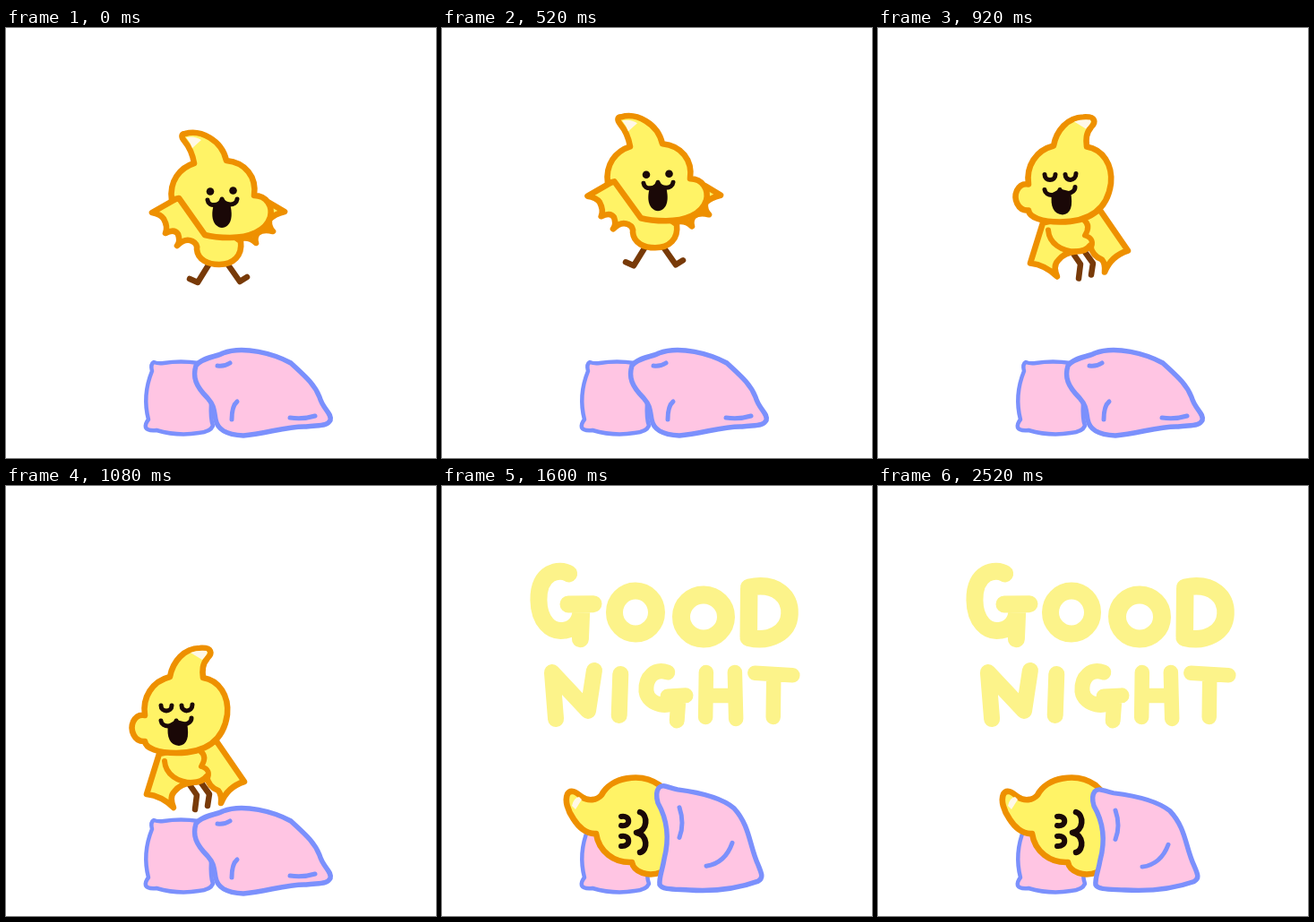
Write an HTML page with a canvas that moves like this. It is 480x480 px and loops after 2.56 s.

```html
<!DOCTYPE html>
<html lang="en">
<head>
<meta charset="utf-8">
<title>Good night</title>
<style>
html, body { margin: 0; width: 100%; height: 100%; overflow: hidden; background: #fff; }
canvas { display: block; width: 100vw; height: 100vh; object-fit: contain; }
</style>
</head>
<body>
<canvas width="480" height="480"></canvas>
<script>
const ctx = document.querySelector('canvas').getContext('2d');
const LOOP = 2560, STEP = 40, BEDTIME = 1200;
const YELLOW = '#fff366', ORANGE = '#ee9000', BROWN = '#783a08', INK = '#1a0807';
const PINK = '#ffc5e3', BLUE = '#7b90fc', LETTER = '#fcf38a';
ctx.lineCap = ctx.lineJoin = 'round';

function shape(d, fill, line, width = 6) {
  const path = new Path2D(d);
  if (fill) { ctx.fillStyle = fill; ctx.fill(path); }
  if (line) { ctx.strokeStyle = line; ctx.lineWidth = width; ctx.stroke(path); }
}
const skin = d => shape(d, YELLOW, ORANGE, 6.6);
const ink = (d, width = 5) => shape(d, null, INK, width);

function oval(x, y, rx, ry, fill, line, width, turn = 0) {
  ctx.beginPath();
  ctx.ellipse(x, y, rx, ry, turn, 0, 7);
  if (fill) { ctx.fillStyle = fill; ctx.fill(); }
  if (line) { ctx.strokeStyle = line; ctx.lineWidth = width; ctx.stroke(); }
}

function group(transform, draw) {
  ctx.save();
  transform();
  draw();
  ctx.restore();
}

// keys: [time, value] pairs, eased between neighbours
function tween(t, keys) {
  const i = keys.findIndex(k => k[0] > t);
  if (i < 0) return keys[keys.length - 1][1];
  if (i === 0) return keys[0][1];
  const [[t0, a], [t1, b]] = [keys[i - 1], keys[i]];
  const u = (t - t0) / (t1 - t0);
  return a + (b - a) * u * u * (3 - 2 * u);
}

function hoverBird(flap, yawning) {
  const w = flap;
  shape('M227 263L214 284L205 280M247 263L261 283L269 278', null, BROWN, 6.5);
  if (!yawning) {
    skin(`M294 195L311 ${205 + 5 * w}Q299 ${208 + 3 * w} 294 214Q293 222 298 227
      Q287 224 281 229Q277 234 279 240Q272 233 262 235Z`);
  }
  skin(`M${193 - 8 * w} ${189 + 2 * w}L${163 - 7 * w} ${206 + 5 * w}
    Q${173 - 4 * w} 208 ${176 - 2 * w} 213Q${181 - 4 * w} 222 ${178 - 4 * w} 229
    Q188 224 192 230Q195 238 191 243Q200 234 208 238Q214 241 213 247
    C214 259 226 264 238 264C254 264 264 254 262 238L240 222Z`);
  group(() => {
    if (!yawning) return;
    ctx.translate(222, 230);
    ctx.rotate(.07);
    ctx.translate(-222, -230);
  }, () => {
    skin(`M200 118C217 113 241 125 246 148C267 150 280 166 277 187
      C291 187 298 199 295 211C290 227 271 234 250 234C239 234 229 233 222 231
      L${193 - 8 * w} ${190 + w}L185 192C182 171 194 156 210 151
      C208 139 204 132 199 126C195 121 196 118 200 118Z`);
    shape('M201 122Q211 120 218 125L208 134Q206 128 201 122Z', '#fff8e8');
  });
  if (yawning) {
    ink('M225 181L235 182M252 184L262 185');
    oval(244, 204, 11.5, 16, '#000');
    oval(262, 226, 19, 14.5, YELLOW, ORANGE, 6.6, .55);
  } else {
    oval(228, 182.5, 4.3, 4.3, INK);
    oval(253.5, 181.5, 4.3, 4.3, INK);
    ink('M225 192C226 200 239 199 241 191C244 199 257 199 258 191');
    shape('M232 197L241 192L250 196C254 211 251 222 241 223C231 222 228 210 232 197Z', INK);
  }
}

function divingBird() {
  shape('M204 332L213 345L211 361M217 330L227 344L225 357', null, BROWN, 6.5);
  skin(`M171 299L157 344Q174 346 187 359Q182 347 188 341Q195 332 208 331
    Q219 331 224 324Q226 336 237 340Q241 345 240 354Q247 336 266 330L235 285Z`);
  shape('M177 307C178 322 192 331 208 331M217 296Q225 302 218 313Q230 317 224 328', null, ORANGE);
  skin(`M183 213C186 196 199 181 216 181C231 180 230 187 225 192
    C219 199 219 206 220 214C238 217 249 234 247 255C243 285 222 298 190 298
    C170 298 156 293 155 285C143 286 138 272 142 263C145 257 150 255 155 256
    C152 236 163 218 183 213Z`);
  shape('M206 186Q214 183 224 184Q226 187 219 194Z', '#fff8e8');
  ink('M173 245C173 253 185 253 185 245M196 245C196 253 208 253 208 244');
  ink('M173 262C174 270 188 270 190 262C192 269 207 267 207 259');
  shape('M181 266L190 261L202 264C205 281 202 289 193 290C183 289 179 281 181 266Z', INK);
}

function sleepingBird() {
  skin(`M140 344C144 337 151 343 156 347C163 352 173 351 178 345
    C188 325 222 319 243 334L275 365L275 415L245 431C230 437 214 431 212 420
    C192 421 175 408 172 388C161 389 152 380 147 372C140 362 137 351 140 344Z`);
  shape('M145 357Q147 348 153 347L156 350L149 361Z', '#fff8e8');
  ink('M200 369C211 367 211 381 200 379M200 391C211 389 211 403 200 402', 6);
  ink('M221 364C230 367 230 385 217 387C230 389 230 407 221 409', 6.5);
}

function pillow() {
  shape(`M165 373Q170 375 176 374Q195 371 215 374L229 418Q228 436 231 444
    Q228 451 215 452Q192 456 168 449Q158 450 156 446Q155 442 159 437
    Q152 410 163 383Q161 375 165 373Z`, PINK, BLUE, 4.5);
}

function emptyBlanket() {
  shape(`M212 377C218 368 235 367 242 363C265 354 300 364 318 374
    C334 389 344 397 350 412C354 426 364 430 362 438C358 445 350 443 335 445
    C315 444 290 453 265 455C245 454 236 448 234 437C232 425 232 421 225 413
    C212 400 208 390 212 377Z`, PINK, BLUE, 5.5);
  shape('M236 377Q244 378 250 374M252 437Q252 422 258 417M317 435Q332 437 345 433', null, BLUE, 5);
}

function fullBlanket(breath) {
  group(() => {
    ctx.translate(1, 451);
    ctx.scale(1, .992 - .034 * breath);
    ctx.translate(0, -450);
  }, () => {
    shape(`M241 335C246 330 251 335 262 337C285 340 310 345 325 358
      C343 378 342 400 352 422C356 432 358 436 352 440C330 448 305 452 275 450
      C258 449 245 450 242 444C241 436 245 428 247 415C253 392 250 370 240 352
      C238 345 238 339 241 335Z`, PINK, BLUE, 5.5);
    shape('M264 357Q270 375 264 391M294 423Q315 420 323 397', null, BLUE, 5);
  });
}

// [centre x, centre y, stroke width, path]
const letters = [
  [138, 133, 19, 'M142 98C132 91 108 95 108 127C108 150 121 164 137 161C150 159 156 148 155 133M141 132L169 132M156 133L154 171'],
  [216, 141, 19, 'M192.500 141A23.500 24 0 1 1 239.500 141A23.500 24 0 1 1 192.500 141'],
  [292, 146, 20, 'M267 146A25 24.500 0 1 1 317 146A25 24.500 0 1 1 267 146'],
  [365, 142, 19.5, 'M343 114L342 168M343 113C375 107 389 125 388 143C387 164 365 175 342 169'],
  [147, 233, 18, 'M127 260L123 208L163 251L170 206'],
  [199, 233, 18, 'M199 210L198 256'],
  [250, 234, 17, 'M252 208C238 203 227 213 228 229C230 245 256 250 263 237M252 235L272 234M264 237L262 262'],
  [311, 234, 16.5, 'M295 208L294 258M296 234L327 234M327 208L328 260'],
  [370, 234, 16.5, 'M349 209L391 211M370 211L370 258']
];

function greeting(t) {
  letters.forEach(([x, y, width, d], i) => group(() => {
    ctx.translate(x, y);
    ctx.rotate(.012 * Math.sin(t / 150 + i * 2));
    ctx.translate(-x, -y);
  }, () => shape(d, null, LETTER, width)));
}

function draw(t) {
  ctx.fillStyle = '#fff';
  ctx.fillRect(0, 0, 480, 480);
  if (t >= BEDTIME) {
    greeting(t);
    pillow();
    sleepingBird();
    fullBlanket(.5 - .5 * Math.cos((t - 1600) / 1840 * 2 * Math.PI));
    return;
  }
  pillow();
  if (t < 840) {
    const rise = tween(t, [[0, 0], [320, -15], [560, -19], [680, -30], [800, -46]]);
    const flap = .5 - .5 * Math.cos(t / 272 * 2 * Math.PI);
    group(() => ctx.translate(0, rise),
      () => hoverBird(flap, t >= 160 && t < 520));
  } else {
    const x = tween(t, [[840, 38], [1000, -12], [1080, 0], [1160, 8]]);
    const y = tween(t, [[840, -110], [1080, 0], [1160, 30]]);
    group(() => ctx.translate(x, y), divingBird);
  }
  emptyBlanket();
}

function frame() {
  const t = performance.now() % LOOP;
  draw(Math.floor(t / STEP) * STEP);
  requestAnimationFrame(frame);
}
frame();
</script>
</body>
</html>
```
